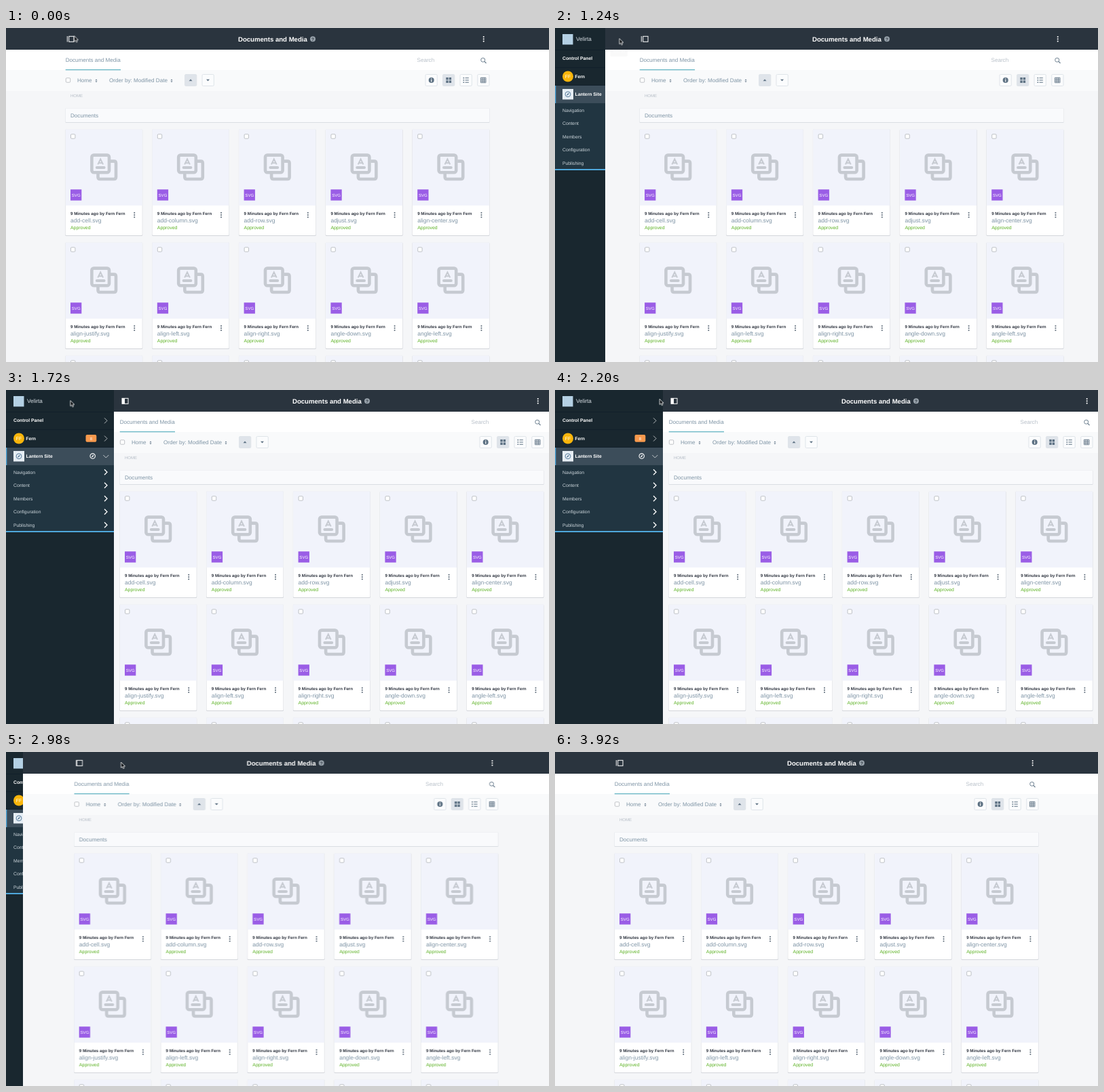
Recreate the animation shown at these times as an HTML page. Size 800 by 493 pixels, loop 3.94 s.

```html
<!DOCTYPE html>
<html lang="en">
<head>
<meta charset="utf-8">
<title>Documents and Media</title>
<style>
html, body { margin: 0; width: 100%; height: 100%; overflow: hidden; background: #f5f6f8; }
svg { display: block; width: 800px; height: 493px; overflow: hidden; }
text { font-family: "Liberation Sans", Arial, sans-serif; font-size: 8.1px; fill: #7e94a5; text-rendering: geometricPrecision; }
.bold { font-weight: 700; }
.mid { text-anchor: middle; }
.title { font-size: 9.6px; fill: #fff; }
.crumb { font-size: 6px; fill: #b4bcc5; }
.hint { fill: #b7bfc8; }
.meta { font-size: 6.2px; fill: #303641; }
.file { font-size: 8.5px; }
.ok { font-size: 6.9px; fill: #5bb122; }
.badge { font-size: 6.1px; fill: #fff; }
.side text { font-size: 6.8px; fill: #fff; }
.side .sub { fill: #ccd5db; }
.side .name { font-size: 8.2px; fill: #dde4e9; }
.line { fill: none; stroke: #fff; }
.btn { fill: #fbfcfd; stroke: #dfe4e9; }
.btn.on { fill: #dfe4ea; }
.ink { fill: #5d7183; }
.box { fill: #fff; stroke: #b0b4b9; stroke-width: .8; }

/* The panel makes room for the sidebar; the centred content moves by half of that. */
.slide, .half { animation: slide 3940ms ease infinite; }
.slide { --d: 159px; }
.half { --d: 80px; }
@keyframes slide {
  0%, 29.4% { transform: translateX(0); }
  37.02%, 71.52% { transform: translateX(var(--d)); }
  79.14%, 100% { transform: translateX(0); }
}
.closed { animation: closed 3940ms step-end infinite; }
@keyframes closed { 0%, 77.66%, 100% { opacity: 1; } 33% { opacity: 0; } }
.open { animation: open 3940ms step-end infinite; }
@keyframes open { 0%, 77.66%, 100% { opacity: 0; } 33% { opacity: 1; } }
.fill { transform-origin: 91px 16px; animation: fill 3940ms linear infinite; }
@keyframes fill {
  0%, 71.52% { transform: scaleX(1); }
  73.6%, 100% { transform: scaleX(.3); }
}
.tip1 { animation: tip1 3940ms linear infinite; }
@keyframes tip1 { 0%, 8.88% { opacity: 0; } 11.17%, 29.4% { opacity: 1; } 31.54%, 100% { opacity: 0; } }
.tip2 { animation: tip2 3940ms linear infinite; }
@keyframes tip2 { 0%, 60.91% { opacity: 0; } 63.2%, 71.52% { opacity: 1; } 73.66%, 100% { opacity: 0; } }
.cursor { animation: cursor 3940ms linear infinite; }
@keyframes cursor {
  0% { transform: translate(100.5px, 11.5px); }
  4.06%, 50.25% { transform: translate(94.8px, 15.5px); }
  55.84% { transform: translate(154px, 13.2px); }
  58.88%, 100% { transform: translate(169.5px, 15px); }
}
.arrow { animation: arrow 3940ms step-end infinite; }
@keyframes arrow {
  0%, 30.46%, 72.59% { opacity: 1; }
  3.05%, 58.88%, 81.22%, 100% { opacity: 0; }
}
.hand { animation: hand 3940ms step-end infinite; }
@keyframes hand {
  0%, 30.46%, 72.59%, 100% { opacity: 0; }
  3.05%, 58.88% { opacity: 1; }
}
</style>
</head>
<body>
<svg viewBox="0 0 800 493">
  <defs>
    <g id="kebab"><circle cy="-3.3" r="1.05"/><circle r="1.05"/><circle cy="3.3" r="1.05"/></g>
    <path id="sort" class="ink" d="M-1.5-.5 0-2.3 1.500-.5zM-1.5.8 0 2.600 1.500.8z"/>
    <rect id="check" class="box" x="-3.2" y="-3.2" width="6.4" height="6.4" rx="1.2"/>
    <g id="stack" fill="none" stroke="#c6cad1" stroke-width="4.6">
      <rect x="126.4" y="187.6" width="25.6" height="25.6" rx="3"/>
      <path d="M154 196.6h5q3 0 3 3V220q0 3-3 3h-20.5q-3 0-3-3v-5"/>
      <path d="M133.8 206h10.8" stroke-width="4" stroke-linecap="round"/>
      <path d="M135.3 201.400 139.200 193.600 143.100 201.400M137 199.300h4.400" stroke-width="2"/>
    </g>
    <g id="tip">
      <path d="M92 25.5 94.5 23 97 25.5z"/>
      <rect x="81.5" y="25" width="25.3" height="17.3" rx="2"/>
      <text class="mid" x="94.2" y="36.4" style="font-size:7.2px;fill:#fff">Menu</text>
    </g>
  </defs>

  <g class="side" id="side">
    <rect width="160" height="493" fill="#19272f"/>
    <path d="M0 32.5H160M0 58.5H160M0 84.5H160" stroke="#12202a"/>
    <rect y="85" width="160" height="26" fill="#3c4d5a"/>
    <rect y="111" width="160" height="98" fill="#213541"/>
    <rect y="85" width="1.3" height="26" fill="#4fa8dc"/>
    <rect y="208" width="160" height="2" fill="#4fa8dc"/>
    <rect x="11" y="9" width="15.5" height="15.5" fill="#b4d0e4"/>
    <text class="name" x="31" y="19.3">Velirta</text>
    <text class="bold" x="11" y="47.3">Control Panel</text>
    <circle cx="19" cy="71.5" r="8" fill="#f9b50b"/>
    <text class="mid" x="19" y="74">FF</text>
    <text class="bold" x="29.3" y="74">Fern</text>
    <rect x="117.5" y="66" width="15.8" height="10.7" rx="2" fill="#f8994d"/>
    <text class="mid" x="125.4" y="73.5" style="font-size:6px">8</text>
    <rect x="11" y="90" width="16" height="15.5" fill="#e6eef5"/>
    <circle cx="19" cy="97.8" r="3.9" fill="none" stroke="#577c9b"/>
    <path d="M21.2 95.6 19.7 98.5 16.8 100 18.3 97.1z" fill="#577c9b"/>
    <text class="bold" x="29.5" y="100.3">Lantern Site</text>
    <circle class="line" cx="127.7" cy="97.6" r="3.7" stroke-width="1.1"/>
    <path d="M129.8 95.5 128.4 98.3 125.6 99.7 127 96.9z" fill="#fff"/>
    <path class="line" d="M143.3 96 147.3 100 151.3 96" stroke-width=".9" opacity=".75"/>
  </g>

  <g class="slide">
    <rect width="800" height="493" fill="#f5f6f8"/>
    <rect y="62" width="800" height="31" fill="#f9fafb"/>
    <rect y="32" width="800" height="30" fill="#fff"/>
    <rect width="800" height="32" fill="#2a343e"/>
  </g>

  <g class="half">
    <g class="closed line"><path d="M90.3 12V20.5"/><rect x="92.7" y="12.3" width="7.3" height="8"/></g>
    <g class="open">
      <rect class="line" x="91" y="12.3" width="9" height="8"/>
      <rect class="fill" x="91" y="12.3" width="4" height="8" fill="#fff"/>
    </g>
    <text class="title bold" x="342" y="19.8">Documents and Media</text>
    <circle cx="452" cy="16.2" r="4" fill="#98a2ab"/>
    <text class="mid bold" x="452" y="18.6" style="font-size:6.5px;fill:#2a343e">?</text>
    <use href="#kebab" x="703.7" y="16.3" fill="#fff"/>

    <text x="87.7" y="50">Documents and Media</text>
    <rect x="87.7" y="61" width="81.3" height="1.3" fill="#66b5c4"/>
    <text class="hint" x="605.5" y="50">Search</text>
    <g fill="none" stroke="#6c7f8f"><circle cx="702.7" cy="47.2" r="3"/><path d="M704.9 49.4 707.5 52" stroke-width="1.3"/></g>

    <use href="#check" x="91.5" y="77"/>
    <text x="105" y="80">Home</text>
    <use href="#sort" x="133" y="77.7"/>
    <text x="152" y="80">Order by: Modified Date</text>
    <use href="#sort" x="244" y="77.7"/>
    <g id="buttons"></g>
    <g class="ink">
      <path d="M269.5 78.3 272 75.5 274.5 78.3zM295 75.8 297.5 78.6 300 75.8z"/>
      <circle cx="626.7" cy="77" r="4"/>
      <path d="M648.3 73h3.4v3.4h-3.4zM652.7 73h3.4v3.4h-3.4zM648.3 77.5h3.4v3.4h-3.4zM652.7 77.5h3.4v3.4h-3.4z"/>
      <path d="M673.5 73h1.6v1.6h-1.6zM673.5 76.2h1.6v1.6h-1.6zM673.5 79.4h1.6v1.6h-1.6zM676.5 73.3h5.3v1h-5.3zM676.5 76.5h5.3v1h-5.3zM676.5 79.7h5.3v1h-5.3z"/>
    </g>
    <path d="M626.7 74.3v1.2M626.7 76.3v3.2" stroke="#fff" stroke-width="1.2"/>
    <path d="M699.5 73.3h7.4v7.4h-7.4zM699.5 75.8h7.4M699.5 78.3h7.4M702 73.3v7.4M704.5 73.3v7.4" fill="none" stroke="#5d7183" stroke-width=".9"/>

    <text class="crumb" x="95" y="102.2">HOME</text>
    <rect x="87.5" y="118.5" width="625" height="21.6" rx="1" fill="#d9dde2"/>
    <rect x="87.8" y="118.5" width="624.4" height="20.6" rx="1" fill="#f9fafc"/>
    <text x="95" y="131.8">Documents</text>
    <g id="cards"></g>
  </g>

  <g class="tip1"><use href="#tip" fill="#14181b"/></g>
  <g class="tip2"><use href="#tip" x="80" fill="#14181b"/></g>
  <g class="cursor">
    <path class="arrow" d="M0 0V8.3L1.9 6.6 3.2 9.5 4.7 8.8 3.4 6H6z" fill="#101418" stroke="#fff" stroke-width=".8"/>
    <path class="hand" d="M1.2 0q1.1 0 1.1 1.1V4l3 .7q1.3.3 1.1 1.7L5.8 9.5H1.7L-1.2 6.3q-.4-1 .6-1L.2 5.9V1.1Q.2 0 1.2 0z" fill="#fff" stroke="#15191d" stroke-width=".7"/>
  </g>
</svg>
<script>
const byId = id => document.getElementById(id);

const files = ["add-cell", "add-column", "add-row", "adjust", "align-center",
  "align-justify", "align-left", "align-right", "angle-down", "angle-left"];

// The card is drawn at its first position and shifted along the grid.
const card = i => {
  const x = (i % 5) * 127.8, y = Math.floor(i / 5) * 167;
  return `<g transform="translate(${x} ${y})">
    <rect x="87.3" y="149.6" width="113.9" height="157.4" rx="1.5" fill="#d3d6db"/>
    <rect x="87.7" y="149.6" width="113" height="156.4" rx="1.5" fill="#fff"/>
    <rect x="87.7" y="149.6" width="113" height="112.4" fill="#f1f3fb"/>
    <use href="#check" x="98.7" y="160"/>
    <use href="#stack"/>
    <rect x="95" y="238.3" width="16.3" height="16.3" fill="#9a5de6"/>
    <text class="badge mid" x="103.2" y="248.7">SVG</text>
    <text class="meta bold" x="95" y="276.4">9 Minutes ago by Fern Fern</text>
    <text class="file" x="95" y="287">${files[i] || "file"}.svg</text>
    <text class="ok" x="95" y="296.7">Approved</text>
    <use href="#kebab" x="189.2" y="276" fill="#5c6a78"/>
  </g>`;
};
byId("cards").innerHTML = Array.from({ length: 15 }, (_, i) => card(i)).join("");

byId("buttons").innerHTML = [263.5, 289, 618, 643.5, 669, 694.7].map((x, i) =>
  `<rect class="btn ${i === 0 || i === 3 ? "on" : ""}" x="${x}" y="68.5" width="17.3" height="17" rx="1.5"/>`
).join("");

const chevron = (y, width, alpha) =>
  `<path class="line" d="M145 ${y - 4}l4 4-4 4" stroke-width="${width}" opacity="${alpha}"/>`;
const items = ["Navigation", "Content", "Members", "Configuration", "Publishing"];
byId("side").insertAdjacentHTML("beforeend",
  chevron(45.3, 0.9, 0.75) + chevron(71.6, 0.9, 0.75) +
  items.map((name, i) => {
    const y = 121.3 + i * 19.5;
    return `<text class="sub" x="11" y="${y + 2.2}">${name}</text>` + chevron(y, 1.3, 1);
  }).join(""));
</script>
</body>
</html>
```
